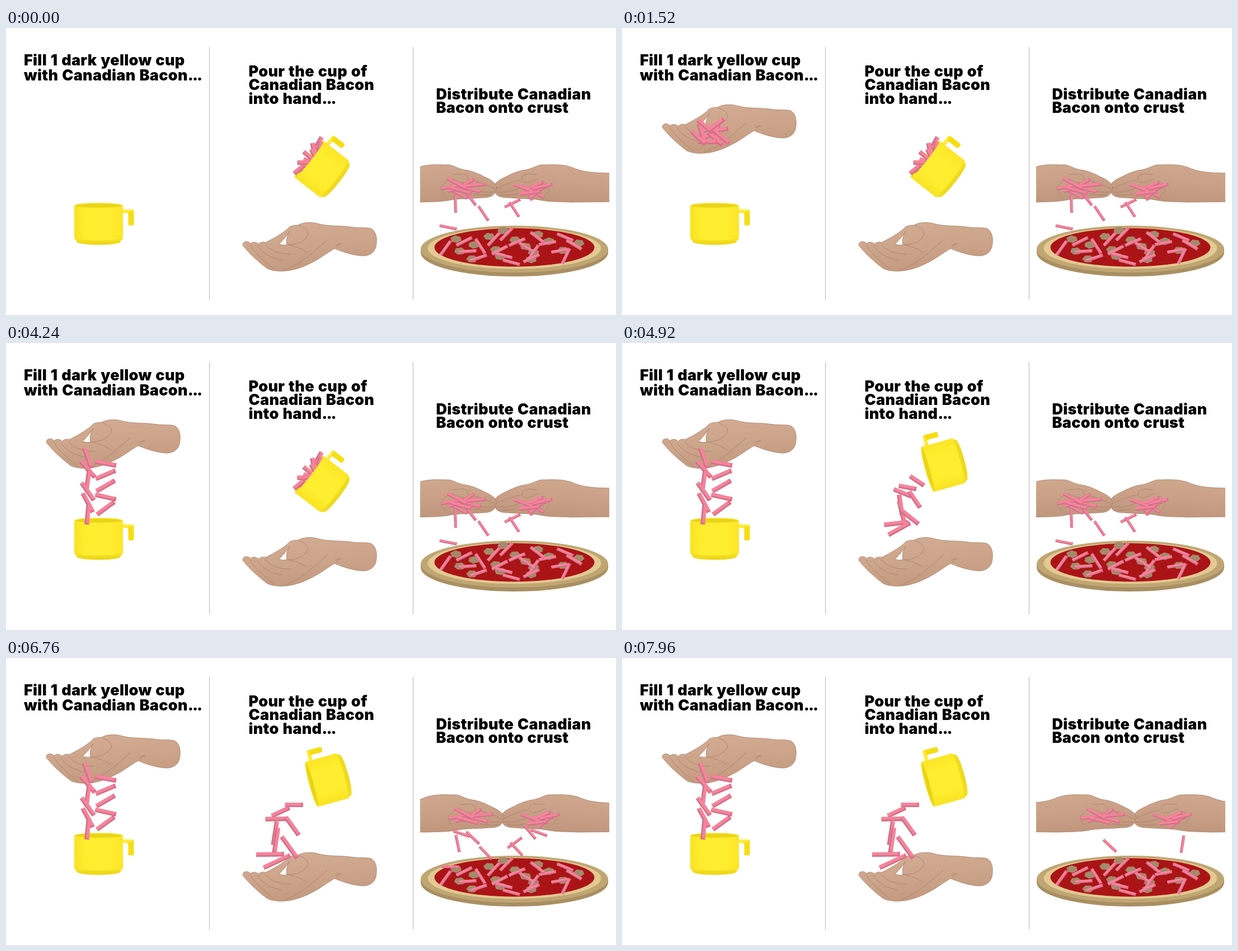
An HTML page with a canvas that plays this animation: 1090x514 px, repeating every 8000 ms.

```html
<!DOCTYPE html>
<html lang="en">
<head>
<meta charset="utf-8">
<title>Canadian Bacon steps</title>
<style>
html, body { margin: 0; width: 100%; height: 100%; overflow: hidden; background: #fff; }
canvas, svg { position: absolute; left: 0; top: 0; width: 1090px; height: 514px; }
text { font: 900 27px Inter, "Open Sans", sans-serif; letter-spacing: .3px; word-spacing: 1.2px; fill: #000; }
.dots { letter-spacing: -2px; }
</style>
</head>
<body>
<canvas id="stage" width="1090" height="514"></canvas>
<svg viewBox="0 0 1090 514">
  <text x="32" y="66.5">Fill 1 dark yellow cup</text>
  <text x="32" y="93.5">with Canadian Bacon<tspan class="dots">...</tspan></text>
  <text x="433.5" y="86.5">Pour the cup of</text>
  <text x="433.5" y="111">Canadian Bacon</text>
  <text x="433.5" y="135.5">into hand<tspan class="dots">...</tspan></text>
  <text x="768.5" y="127.5">Distribute Canadian</text>
  <text x="768.5" y="152">Bacon onto crust</text>
</svg>
<script>
const ctx = document.getElementById('stage').getContext('2d');
const LOOP = 8000, STEP = 40;
const LINE = '#a67f69';

const clamp = v => Math.max(0, Math.min(1, v));
const span = (t, a, b) => clamp((t - a) / (b - a));
const mix = (a, b, p) => a + (b - a) * p;
const ease = p => (1 - Math.cos(Math.PI * p)) / 2;
const list = (n, fn) => Array.from({ length: n }, (_, i) => fn(i));

// Repeatable noise in 0..1.
function noise(n) {
  const s = Math.sin(n * 127.1) * 43758.5453;
  return s - Math.floor(s);
}

function withState(fn) {
  ctx.save();
  fn();
  ctx.restore();
}

function gradient(x1, y1, x2, y2, ...colors) {
  const g = ctx.createLinearGradient(x1, y1, x2, y2);
  colors.forEach((c, i) => g.addColorStop(i / (colors.length - 1), c));
  return g;
}

function ellipse(x, y, rx, ry, color) {
  ctx.fillStyle = color;
  ctx.beginPath();
  ctx.ellipse(x, y, rx, ry, 0, 0, 7);
  ctx.fill();
}

// ---- bacon ----
// A strip is { x, y, angle, len } around its centre, in degrees.
function drawStrip({ x, y, angle, len }, w) {
  withState(() => {
    ctx.translate(x, y);
    ctx.rotate(angle * Math.PI / 180);
    ctx.fillStyle = '#cf7289';
    ctx.fillRect(-len / 2, -w / 2, len, w);
    ctx.fillStyle = '#f7839c';
    ctx.fillRect(-len / 2, -w / 2, len, w * 0.65);
    ctx.fillStyle = '#e36c87';
    ctx.fillRect(len / 2 - w * 0.35, -w / 2, w * 0.35, w);
  });
}

function between(a, b, p) {
  return {
    x: mix(a.x, b.x, p), y: mix(a.y, b.y, p),
    angle: mix(a.angle, b.angle, p), len: mix(a.len, b.len, p)
  };
}

// Even spread over an ellipse: sunflower order.
function spot(i, n, x, y, rx, ry) {
  const r = Math.sqrt((i + 0.5) / n), a = i * 2.4;
  return { x: x + rx * r * Math.cos(a), y: y + ry * r * Math.sin(a) };
}

const scatter = (n, x, y, rx, ry, turn, len) => list(n, i => ({
  ...spot(i, n, x, y, rx, ry),
  angle: turn * (2 * noise(i + n) - 1),
  len
}));

// ---- cup ----
const cupBody = new Path2D('M-43.5 -32C-43 -27 43 -27 43.5 -32L43.5 26Q43 29 40 30L39 33C34 40 -34 40 -39 33L-40 30Q-43 29 -43.5 26Z');
const cupBase = new Path2D('M-43 26C-30 32 30 32 43 26L40 30L39 33C34 40 -34 40 -39 33L-40 30Z');
const cupHandle = new Path2D('M43 -25H59Q63 -25 63 -21V2Q61 5 53 3V-16Q53 -19 50 -19H43Z');
const handleTop = new Path2D('M43 -25H60L62 -22L54 -20H43Z');

function atCup(x, y, deg, scale, fn) {
  withState(() => {
    ctx.translate(x, y);
    ctx.rotate(deg * Math.PI / 180);
    ctx.scale(scale, scale);
    fn();
  });
}

function cupBack() {
  ellipse(0, -32, 43.5, 4.8, '#f6e01f');
  ellipse(0, -31.5, 41, 3.6, '#ead418');
}

function cupFront() {
  ctx.fillStyle = '#f6dd12';
  ctx.fill(cupHandle);
  ctx.fillStyle = '#ffec3a';
  ctx.fill(handleTop);
  ctx.fillStyle = gradient(-44, 0, 44, 0, '#f8e322', '#ffed2f', '#ffed2f', '#ffed2f', '#fbe626');
  ctx.fill(cupBody);
  ctx.fillStyle = gradient(0, 26, 0, 39, '#f8e322', '#ead31a');
  ctx.fill(cupBase);
}

// ---- open hand ----
const hand = new Path2D('M424 385C427 381 434 382 437 386C441 382 448 383 451 387C456 382 461 383 464 384C478 377 492 369 503 360C506 355 512 353 522 353C530 348 545 347 556 350C575 356 597 353 622 357C636 358 645 357 652 359C662 364 664 378 661 392C658 404 646 409 636 408C620 407 604 402 587 395C575 402 566 409 556 415C540 424 525 431 508 434C490 437 476 435 467 431C455 422 436 406 423 389Z');
const handGap = new Path2D('M507 364C502 372 500 380 502 388C498 389 493 389 488 387C495 380 502 372 507 364Z');
const handLines = new Path2D('M436 388C444 402 458 414 478 431M449 389C458 404 474 412 494 416M463 387C472 400 490 405 510 405M503 388C515 391 528 394 538 402M523 354C541 360 543 370 535 377C526 386 514 388 503 388M498 434C532 420 550 400 574 380M588 389l12 -3M590 393l7 -8');

function openHand(dx, dy) {
  withState(() => {
    ctx.translate(dx, dy);
    ctx.fillStyle = gradient(540, 348, 550, 436, '#d2ab92', '#cca48a', '#c2997f');
    ctx.fill(hand);
    ctx.lineWidth = 0.8;
    ctx.strokeStyle = LINE;
    ctx.stroke(hand);
    ctx.fillStyle = '#fff';
    ctx.fill(handGap);
    ctx.stroke(handGap);
    ctx.stroke(handLines);
  });
}

// ---- panel 1: hand to cup ----
const COUNT = 11;
const pile = scatter(COUNT, 158, 190, 25, 19, 85, 34);
// The stream zigzags: steep strips on the left, flat ones on the right.
const stream = list(COUNT, i => {
  const left = i % 2 === 0;
  return {
    x: 160 + (left ? -14 : 18),
    y: 206 + 10 * i,
    angle: (left ? 70 : -15) + 28 * Math.sin(2 * i),
    len: 38
  };
});

function panelOne(t) {
  atCup(165.5, 350, 0, 1, () => { cupBack(); cupFront(); });
  const enter = ease(span(t, 520, 1440));
  withState(() => {
    ctx.globalAlpha = enter;
    ctx.translate(24 * (1 - enter), 8 * (1 - enter));
    openHand(-351, -211);
    pile.forEach((p, i) => {
      const fall = ease(span(t, 1520, 2220 + i * 22));
      drawStrip(between(p, stream[i], fall), 8);
    });
  });
}

// ---- panel 2: cup to hand ----
const inCup = list(9, i => ({
  x: mix(558, 524, i / 8) + 6 * (i % 2),
  y: mix(206, 253, i / 8) + 4 * (i % 2),
  angle: 120 - 20 * i,
  len: 24
}));
const spilled = list(9, i => ({
  x: 497 - 1.5 * i + 19 * Math.sin(2.2 * i + 1.2),
  y: 263 + 12.7 * i,
  angle: 40 + 65 * Math.cos((i - 4.5) * 0.9),
  len: 32 + 2.5 * i
}));

function panelTwo(t) {
  const turn = ease(span(t, 4200, 4880));
  const pose = [mix(566, 576, turn), mix(254, 218, turn), mix(-52, -105.5, turn), 0.96];
  const spill = ease(span(t, 4200, 5320));
  openHand(0, 0);
  atCup(...pose, cupBack);
  inCup.forEach((p, i) => drawStrip(between(p, spilled[i], spill), 8));
  atCup(...pose, cupFront);
}

// ---- panel 3: hands to pizza ----
const toppings = scatter(20, 909, 393, 132, 27, 65, 31);
const blobs = list(16, i => spot(i, 16, 905, 391, 132, 29));

function drawBlob({ x, y }, i) {
  ctx.beginPath();
  for (let a = 0; a < 6.28; a += Math.PI / 12) {
    const r = 1 + 0.08 * Math.sin(a * 6 + i);
    ctx.lineTo(x + 9.5 * r * Math.cos(a), y + 6.3 * r * Math.sin(a));
  }
  ctx.fillStyle = '#a48a6b';
  ctx.fill();
}

function pizza() {
  ellipse(908.5, 402, 167.5, 43, '#a98f62');
  ctx.fillStyle = '#a98f62';
  ctx.fillRect(741, 396, 335, 6);
  ellipse(908.5, 396, 167.5, 42, '#bfa672');
  ellipse(908.5, 394.5, 155, 37, '#e3c993');
  ellipse(908.5, 393, 143, 34.5, '#ab1416');
  blobs.forEach(drawBlob);
  toppings.forEach(p => drawStrip(p, 5.5));
}

const sideHand = new Path2D('M650 260C700 260 718 258 738 249C756 243 778 245 788 245C798 244 806 252 820 254C836 256 850 264 864 271C876 278 879 286 875 290C874 300 866 304 850 304C830 306 810 305 795 308C775 312 755 311 738 312L650 311Z');
const sideLines = new Path2D('M798 262C805 264 811 260 819 262C830 266 827 277 818 277C810 277 804 271 796 270M828 272C845 275 860 282 875 289M830 287C845 294 858 294 872 294M788 275C774 282 776 292 784 298M835 297C847 300 856 300 866 298');
const held = [
  ...scatter(8, 818, 285, 27, 7, 32, 40),
  ...scatter(7, 942, 288, 22, 8, 42, 36)
];

// Strips on their way down: x, y and angle when they leave the hand.
const early = [
  [803, 315, 88], [830, 305, 53], [853, 332, 56], [905, 314, -26], [908, 325, 57],
  [790, 357, 11], [810, 298, 28], [932, 295, 60], [948, 296, 30]
];
const late = [[864, 300, 62], [994, 297, 118]];

function drawDrop([x, y, angle], age) {
  const fall = 0.045 * age + 0.00002 * age * age;
  drawStrip({ x: x + 0.012 * age, y: Math.min(y + fall, 400), angle: angle - 0.03 * age, len: 31 }, 5);
}

function drawSideHand() {
  ctx.fillStyle = gradient(780, 244, 785, 312, '#cfa78d', '#c9a087', '#bf967c');
  ctx.fill(sideHand);
  ctx.lineWidth = 0.8;
  ctx.strokeStyle = LINE;
  ctx.stroke(sideHand);
  ctx.stroke(sideLines);
}

function panelThree(t) {
  const age = Math.max(0, t - 6430);
  const shift = 31.25 * (1 - Math.cos(2 * Math.PI * age / 2200));
  pizza();
  ctx.beginPath();
  ctx.rect(740, 200, 338, 260);
  ctx.clip();
  withState(() => {
    ctx.translate(shift, 0);
    withState(() => {
      ctx.translate(1748, 0);
      ctx.scale(-1, 1);
      drawSideHand();
    });
    drawSideHand();
  });
  withState(() => {
    ctx.globalAlpha = 1 - span(age, 1100, 1260);
    early.forEach(d => drawDrop(d, age));
    ctx.globalAlpha = span(age, 900, 1000);
    late.forEach(d => drawDrop(d, age - 900));
  });
  withState(() => {
    ctx.translate(shift, 0);
    held.forEach(p => drawStrip(p, 6));
  });
}

function draw(t) {
  ctx.fillStyle = '#fff';
  ctx.fillRect(0, 0, 1090, 514);
  ctx.fillStyle = '#b5b5b5';
  ctx.fillRect(363, 34, 1, 452);
  ctx.fillRect(727, 34, 1, 452);
  for (const panel of [panelOne, panelTwo, panelThree]) withState(() => panel(t));
}

const start = performance.now();
function tick() {
  const t = (performance.now() - start) % LOOP;
  draw(Math.floor(t / STEP) * STEP);
  requestAnimationFrame(tick);
}
tick();
</script>
</body>
</html>
```
